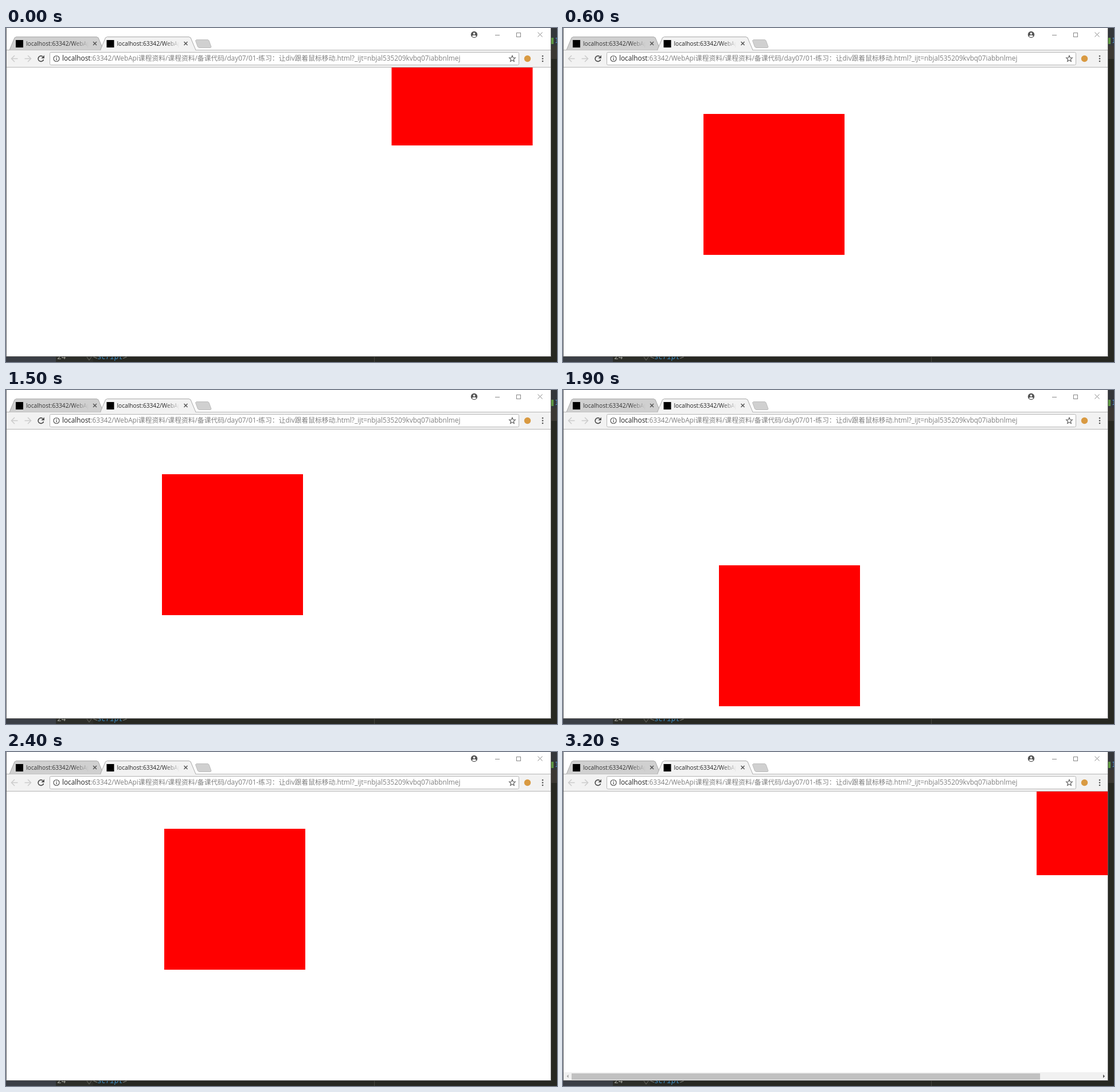
An HTML page with a canvas that plays this animation: 961 px wide and 583 px high, repeating every 3800 ms.

```html
<!DOCTYPE html>
<html lang="zh-CN">
<head>
<meta charset="utf-8">
<title>Moving div</title>
<style>
html, body { margin: 0; width: 100%; height: 100%; overflow: hidden; background: #fff; }
canvas { display: block; width: 961px; height: 583px; }
</style>
</head>
<body>
<canvas id="stage" width="961" height="583"></canvas>
<script>
const ctx = document.getElementById('stage').getContext('2d');
const STEP = 100, LOOP = 3800, SIZE = 246;
const PAGE = { left: 1, top: 69, right: 950, bottom: 573 };
const SANS = '"Open Sans", "Noto Sans", "Noto Sans CJK SC", "Noto Sans CJK", sans-serif';
const MONO = '"DejaVu Sans Mono", monospace';

// Top-left corner of the square, one point per step
const path = [
  [672.5, -41], [524, 2], [472, 16], [411, 38], [322, 74], [277, 106],
  [245, 150], [228, 205], [232, 242], [282, 265], [337, 254],
  [368, 228], [372, 195], [358, 164], [318, 148], [272, 147], [225, 153],
  [157, 200], [156, 260], [272, 306], [378, 251], [458, 191], [470, 126],
  [386, 95], [276, 134], [215, 193], [265, 255], [359, 266], [447, 229],
  [606, 104], [691, 26], [774, -16], [826, -31]
];

function rect(x, y, w, h, color) {
  ctx.fillStyle = color;
  ctx.fillRect(x, y, w, h);
}

function trace(points, close) {
  ctx.beginPath();
  points.forEach(([x, y]) => ctx.lineTo(x, y));
  if (close) ctx.closePath();
}

function line(points, color, width = 1) {
  trace(points);
  ctx.strokeStyle = color;
  ctx.lineWidth = width;
  ctx.stroke();
}

function shape(points, color) {
  trace(points, true);
  ctx.fillStyle = color;
  ctx.fill();
}

function disc(x, y, r, color) {
  ctx.beginPath();
  ctx.arc(x, y, r, 0, Math.PI * 2);
  ctx.fillStyle = color;
  ctx.fill();
}

function ring(x, y, r, color, width, from = 0, to = Math.PI * 2) {
  ctx.beginPath();
  ctx.arc(x, y, r, from, to);
  ctx.strokeStyle = color;
  ctx.lineWidth = width;
  ctx.stroke();
}

function text(str, x, y, font, color) {
  ctx.font = font;
  ctx.fillStyle = color;
  ctx.fillText(str, x, y);
  return ctx.measureText(str).width;
}

function cross(x, y, r, color, width) {
  line([[x - r, y - r], [x + r, y + r]], color, width);
  line([[x - r, y + r], [x + r, y - r]], color, width);
}

function drawEditor() {
  rect(0, 0, 961, 583, '#272822');
  rect(0, 573, 87, 10, '#3b3f46');
  rect(87, 573, 65, 10, '#2d2e29');
  text('24', 89, 578, '13px ' + MONO, '#a3a49c');
  line([[141, 574], [145, 580], [149, 574]], '#6b6c66');
  const bracket = text('<', 152, 578, '12.3px ' + MONO, '#8a8b84');
  const word = text('script', 152 + bracket, 578, 'italic 12.3px ' + MONO, '#3d8fc6');
  text('>', 152 + bracket + word, 578, '12.3px ' + MONO, '#8a8b84');
  rect(642, 573, 1, 10, '#45463f');
  rect(951, 0, 10, 31, '#33363a');
  rect(951, 31, 10, 23, '#3b3833');
  rect(951, 17, 4, 11, '#5c9440');
  text('1', 957, 26, '12px ' + MONO, '#4d8fd0');
  rect(0, 0, 1, 574, '#606266');
}

function drawTab(x, end, fill, titleColor) {
  const edge = [[x, 38.5], [x + 9, 17], [x + 12, 15.5], [end - 12, 15.5], [end - 9, 17], [end, 38.5]];
  shape(edge, fill);
  line(edge, '#a9a9a9');
  rect(x + 11, 21, 13, 13, '#000');
  const fade = ctx.createLinearGradient(x + 112, 0, x + 138, 0);
  fade.addColorStop(0, titleColor);
  fade.addColorStop(1, titleColor + '00');
  ctx.save();
  ctx.beginPath();
  ctx.rect(x + 28, 16, 110, 22);
  ctx.clip();
  text('localhost:63342/WebApi', x + 29, 31, '10.2px ' + SANS, fade);
  ctx.restore();
  cross(x + 149, 27, 3, '#555', 1.4);
}

function drawArrow(x, dir) {
  line([[x - 5.5 * dir, 53.5], [x + 5 * dir, 53.5]], '#cbcbcb', 1.5);
  line([[x, 48], [x + 5.5 * dir, 53.5], [x, 59]], '#cbcbcb', 1.5);
}

function drawStar(cx, cy) {
  const points = [];
  for (let i = 0; i < 10; i++) {
    const a = -Math.PI / 2 + i * Math.PI / 5, r = i % 2 ? 2.5 : 5.6;
    points.push([cx + r * Math.cos(a), cy + r * Math.sin(a)]);
  }
  trace(points, true);
  ctx.strokeStyle = '#555';
  ctx.lineWidth = 1.1;
  ctx.stroke();
}

function drawToolbar() {
  rect(1, 38, 949, 30, '#f2f2f2');
  drawArrow(15, -1);
  drawArrow(38, 1);
  ring(61, 53.5, 4.8, '#4a4a4a', 1.7, 0.35, 5.4);
  shape([[66.8, 47.5], [66.8, 53], [61.3, 53]], '#4a4a4a');

  ctx.beginPath();
  ctx.roundRect(76.5, 42.5, 818, 22, 2);
  ctx.fillStyle = '#fff';
  ctx.fill();
  ctx.strokeStyle = '#b4b4b4';
  ctx.lineWidth = 1;
  ctx.stroke();

  ring(88, 53.5, 5, '#555', 1.2);
  rect(87.4, 50, 1.3, 1.4, '#555');
  rect(87.4, 52.6, 1.3, 3.8, '#555');
  const font = '11.8px ' + SANS;
  const host = text('localhost', 98, 57, font, '#222');
  text(':63342/WebApi课程资料/课程资料/备课代码/day07/01-练习:让div跟着鼠标移动.html?_ijt=nbjal535209kvbq07iabbnlmej'
    .replace('习:', '习：'), 98 + host, 57, font, '#808080');
  drawStar(883, 53.8);
  disc(909.5, 53.5, 5.7, '#d99a42');
  for (const y of [49, 53.5, 58]) disc(936, y, 1.3, '#555');
}

function drawWindow() {
  rect(1, 0, 950, 574, '#fff');
  rect(950, 0, 1, 574, '#5c5c5c');
  rect(0, 573, 951, 1, '#5c5c5c');

  drawToolbar();
  rect(1, 38, 949, 1, '#b4b4b4');
  drawTab(6, 170, '#d0d0d0', '#333333');
  drawTab(164.5, 331, '#f2f2f2', '#222222');
  rect(166, 38, 164, 1, '#f2f2f2');
  rect(1, 68, 949, 1, '#b4b4b4');
  const plus = [[330.5, 22], [332, 20.5], [352, 20.5], [354, 22], [358, 33], [357, 34.5], [337, 34.5], [334.5, 33]];
  shape(plus, '#d0d0d0');
  line([...plus, plus[0]], '#bcbcbc');

  disc(816.5, 11.5, 5.7, '#555');
  disc(816.5, 9.7, 1.8, '#fff');
  ctx.beginPath();
  ctx.ellipse(816.5, 14.3, 3.4, 1.7, 0, 0, Math.PI * 2);
  ctx.fillStyle = '#fff';
  ctx.fill();
  rect(853, 12, 8, 1, '#888');
  ctx.strokeStyle = '#888';
  ctx.lineWidth = 1;
  ctx.strokeRect(890.5, 8.5, 7, 7);
  cross(931.5, 11.5, 4, '#888', 1);
}

function drawScrollbar(contentWidth) {
  rect(PAGE.left, 559, 949, 14, '#f1f1f1');
  rect(15, 561, 922 * 950 / contentWidth, 11, '#c1c1c1');
  shape([[9.5, 563], [9.5, 569], [6.5, 566]], '#a3a3a3');
  shape([[942, 563], [942, 569], [945, 566]], '#505050');
}

function draw(now) {
  const step = Math.floor((now % LOOP) / STEP);
  const [x, y] = path[Math.min(step, path.length - 1)];
  drawEditor();
  drawWindow();
  ctx.save();
  ctx.beginPath();
  ctx.rect(PAGE.left, PAGE.top, PAGE.right - PAGE.left, PAGE.bottom - PAGE.top);
  ctx.clip();
  rect(x, y, SIZE, SIZE, '#f00');
  if (x + SIZE > PAGE.right) drawScrollbar(x + SIZE);
  ctx.restore();
}

const start = performance.now();
function tick() {
  draw(performance.now() - start);
  requestAnimationFrame(tick);
}
tick();
</script>
</body>
</html>
```
